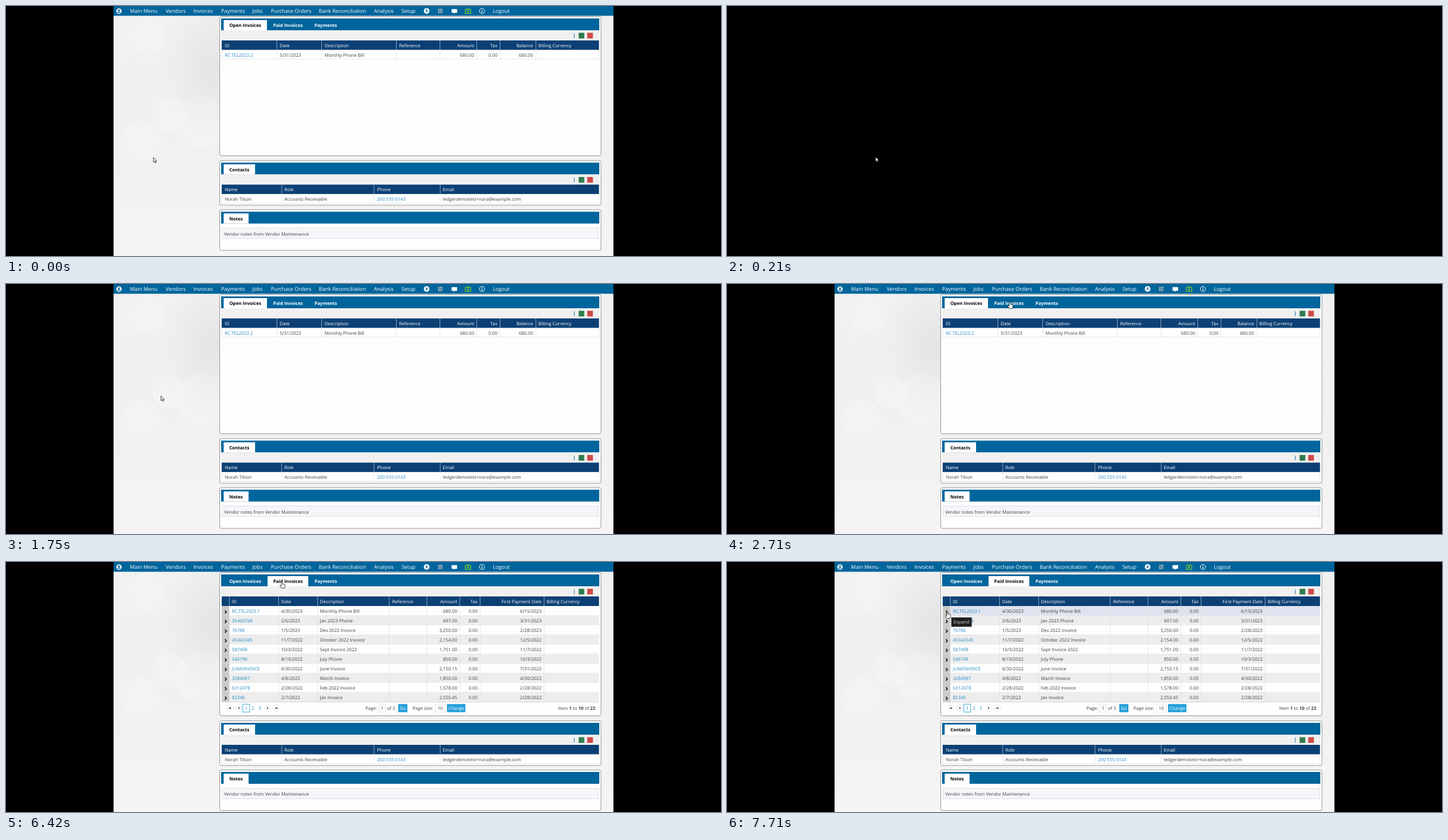
An HTML page for the animation above (8000 ms loop, 1263 by 443 pixels).

```html
<!DOCTYPE html>
<html lang="en">
<head>
<meta charset="utf-8">
<title>Vendor invoices</title>
<style>
html, body { margin: 0; width: 100%; height: 100%; overflow: hidden; background: #000002; }
svg { display: block; width: 100vw; height: 100vh; }
text { font-family: "Open Sans", "Noto Sans", sans-serif; font-size: 8px; fill: #3f3f3f; text-rendering: geometricPrecision; white-space: pre; }
.nav { font-size: 9.2px; fill: #fff; }
.tab { font-weight: 700; fill: #fff; }
.tab.on { fill: #000; }
.head { fill: #fff; }
.link { fill: #2389c6; }
.bold { font-weight: 700; }
</style>
</head>
<body>
<svg id="stage" viewBox="0 0 1263 443" xmlns="http://www.w3.org/2000/svg"></svg>
<script>
const LOOP = 8000;
const BLUE = '#00659c', NAVY = '#0c4075', SKY = '#259fda';

const rect = (x, y, w, h, fill, extra = '') =>
  `<rect x="${x}" y="${y}" width="${w}" height="${h}" fill="${fill}" ${extra}/>`;
const circle = (x, y, r, fill, extra = '') =>
  `<circle cx="${x}" cy="${y}" r="${r}" fill="${fill}" ${extra}/>`;
const path = (d, fill, extra = '') => `<path d="${d}" fill="${fill}" ${extra}/>`;
const text = (x, y, s, cls = '', anchor = 'start') =>
  `<text x="${x}" y="${y}" class="${cls}" text-anchor="${anchor}">${s}</text>`;
const vline = (x, y, h, color) => rect(x - 0.4, y, 0.8, h, color);
const group = (id, body) => `<g id="${id}">${body}</g>`;

function backdrop() {
  const bokeh = [[248, 52, 34], [345, 205, 46], [288, 192, 30], [238, 240, 36]];
  return `<defs>
    <linearGradient id="paper" x1="0" y1="0" x2="0" y2="1">
      <stop offset="0" stop-color="#f1f1f2"/><stop offset=".5" stop-color="#f0f0f1"/><stop offset="1" stop-color="#f5f5f6"/>
    </linearGradient>
    <radialGradient id="shade"><stop offset="0" stop-color="#dcdcde" stop-opacity=".6"/><stop offset="1" stop-color="#dcdcde" stop-opacity="0"/></radialGradient>
    <clipPath id="page"><rect x="190" y="0" width="883" height="443"/></clipPath></defs>` +
    rect(190, 0, 883, 443, 'url(#paper)') +
    `<g clip-path="url(#page)"><ellipse cx="365" cy="110" rx="90" ry="120" fill="url(#shade)"/>` +
    bokeh.map(([x, y, r]) => circle(x, y, r, '#fff', 'opacity=".16"')).join('') + '</g>';
}

function navBar() {
  const items = [[219, 'Main Menu'], [282, 'Vendors'], [331, 'Invoices'], [380, 'Payments'],
    [435, 'Jobs'], [468, 'Purchase Orders'], [552.5, 'Bank Reconciliation'],
    [650, 'Analysis'], [698.5, 'Setup'], [860, 'Logout']];
  let out = rect(190, 0, 883, 17.3, BLUE) + items.map(([x, s]) => text(x, 12, s, 'nav')).join('');
  out += circle(199.6, 9, 4.7, '#fff') + circle(199.6, 7.4, 1.6, BLUE) + path('M196.8 11.8a2.8 2.4 0 0 1 5.6 0z', BLUE);
  out += circle(743, 8.8, 5, '#fff') +
    `<text x="743" y="11.4" text-anchor="middle" style="font-size:7px;font-weight:700;fill:${BLUE}">8</text>`;
  for (let i = 0; i < 9; i++)
    out += rect(763.2 + (i % 3) * 2.8, 5 + Math.floor(i / 3) * 2.8, 2, 2, i % 4 ? '#c3cbd6' : '#d6a29a');
  out += path('M788 5.5h8q1 0 1 1v4.6q0 1-1 1h-3l-2 2v-2h-3q-1 0-1-1v-4.6q0-1 1-1z', '#fff');
  out += rect(811.4, 6.2, 9.6, 7, 'none', 'stroke="#86cf28" stroke-width="1.2"') +
    path('M813.5 3.6l2.7 2.4 2.7-2.4', 'none', 'stroke="#86cf28"') + path('M814.8 7.5v4.4l3.8-2.2z', '#86cf28');
  out += circle(840.8, 8.8, 4.5, 'none', 'stroke="#fff" stroke-width="1"') +
    rect(840.2, 8, 1.2, 3.6, '#fff') + rect(840.2, 5.9, 1.2, 1.2, '#fff');
  return out;
}

// Rounded box with a blue tab strip; tabs are [label x, label, left, right].
function panel(top, bottom, tabs, active = 0) {
  return rect(377.5, top, 673.5, bottom - top, '#fdfefd', 'rx="3" stroke="#929292" stroke-width="1"') +
    rect(380, top + 3.5, 668, 21, BLUE) +
    tabs.map(([x, label, left, right], i) =>
      (i === active ? rect(left, top + 6.5, right - left, 18, '#fff') : '') +
      text(x, top + 18.9, label, i === active ? 'tab on' : 'tab')).join('');
}

function toolStrip(y) {
  return rect(380, y, 668, 18, '#f0f0f0') + rect(1003.2, y + 5.5, 1.2, 8.5, '#3d7fae') +
    rect(1011.5, y + 4.5, 10, 10, '#2f7d4f') + rect(1026.7, y + 4.5, 10, 10, '#cf4a45');
}

// Columns are [text x, title, right aligned, separator x].
function gridHead(y, cols) {
  return rect(381, y, 666.5, 17, NAVY) + cols.map(([x, title, right, sep]) =>
    text(x, y + 11.8, title, 'head', right ? 'end' : 'start') + (sep ? vline(sep, y, 17, '#aebfd2') : '')).join('');
}

function gridRow(y, cols, cells, linkCol) {
  return cols.map(([x, , right, sep], i) =>
    text(x, y + 11.5, cells[i], i === linkCol ? 'link' : '', right ? 'end' : 'start') +
    (sep ? vline(sep, y, 16.5, '#e0e0e0') : '')).join('');
}

const rowFrame = y => rect(381.2, y, 666, 16, '#fff', 'stroke="#dedede" stroke-width=".8"');
const invoiceTabs = [[394.5, 'Open Invoices', 384.5, 461], [472, 'Paid Invoices', 462, 534], [545, 'Payments', 535, 594]];

function openInvoices() {
  const cols = [[386.5, 'ID', 0, 478.5], [483.5, 'Date', 0, 557.5], [562.7, 'Description', 0, 689.5],
    [694.5, 'Reference', 0, 766.5], [827, 'Amount', 1, 831.5], [868, 'Tax', 1, 872.7],
    [931, 'Balance', 1, 936], [940.5, 'Billing Currency', 0, 0]];
  return panel(18.5, 265.5, invoiceTabs, 0) + toolStrip(43) + gridHead(61, cols) + rowFrame(78) +
    gridRow(78, cols, ['RC.TEL2023.2', '5/31/2023', 'Monthly Phone Bill', '', '680.00', '0.00', '680.00', ''], 0);
}

function pager() {
  const y = 259, base = 262;
  const field = (x, w, stroke) => rect(x, y - 7, w, 14, '#fff', `stroke="${stroke}" stroke-width=".9"`);
  const button = (x, w, s) => rect(x, y - 7.3, w, 14.5, SKY) + text(x + w / 2, base, s, 'head', 'middle');
  const arrow = (x, dir, bar) => circle(x, y, 5.6, '#fff', 'stroke="#dedede" stroke-width=".8"') +
    path(`M${x - 1.4 * dir} ${y - 2}l${3 * dir} 2l${-3 * dir} 2z`, '#444') +
    (bar ? rect(x + 1.8 * dir - 0.4, y - 2, 0.8, 4, '#444') : '');
  return arrow(396, -1, 1) + arrow(411, -1, 0) + arrow(462.5, 1, 0) + arrow(477.5, 1, 1) +
    field(418.3, 12, SKY) + [1, 2, 3].map(n => text(412.3 + n * 12, base, n, 'link', 'middle')).join('') +
    text(635, base, 'Page:') + field(658.5, 11.5, '#ddd') + text(664.3, base, '1', '', 'middle') +
    text(673, base, 'of 3') + button(693, 16, 'Go') +
    text(718, base, 'Page size:') + field(758.5, 17, '#e4e4e4') + text(767, base, '10', '', 'middle') +
    button(779, 32.5, 'Change') +
    text(1041, base, 'Item <tspan class="bold">1</tspan> to <tspan class="bold">10</tspan> of <tspan class="bold">22</tspan>', '', 'end');
}

function paidInvoices() {
  const cols = [[399, 'ID', 0, 481.5], [486, 'Date', 0, 550.5], [554.5, 'Description', 0, 677],
    [682, 'Reference', 0, 743.5], [797, 'Amount', 1, 801.7], [833, 'Tax', 1, 837.5],
    [946, 'First Payment Date', 1, 950.5], [955, 'Billing Currency', 0, 0]];
  const rows = `RC.TEL2023.1|4/30/2023|Monthly Phone Bill|680.00|6/15/2023
35466768|2/6/2023|Jan 2023 Phone|697.00|3/31/2023
76786|1/5/2023|Dev 2022 Invoice|3,250.00|2/28/2023
45342345|11/7/2022|October 2022 Invoice|2,154.00|12/5/2022
587498|10/3/2022|Sept Invoice 2022|1,751.00|11/7/2022
546798|8/19/2022|July Phone|850.00|10/3/2022
JUNEINVOICE|6/30/2022|June Invoice|2,150.15|7/31/2022
3284987|4/8/2022|March Invoice|1,850.00|4/30/2022
6312478|2/28/2022|Feb 2022 Invoice|1,578.00|2/28/2022
82346|2/7/2022|Jan Invoice|2,550.45|2/28/2022`.split('\n').map(r => r.split('|'));
  let out = panel(18.5, 272.5, invoiceTabs, 1) + toolStrip(43) + gridHead(61, cols) + vline(394.5, 61, 17, '#aebfd2');
  rows.forEach(([id, date, about, amount, paid], i) => {
    const y = 78 + i * 17;
    out += rect(394.5, y, 653, 17, i % 2 ? '#ededed' : '#fefefe', i ? '' : 'id="firstRow"') +
      rect(381, y, 13.5, 17, '#c9c9c9') + rect(381, y + 16.5, 666.5, 0.5, '#e2e2e2') +
      path(`M386.7 ${y + 7.7}l2.7 2.7-2.7 2.7`, 'none', 'stroke="#111" stroke-width="1.5"') +
      gridRow(y, cols, [id, date, about, '', amount, '0.00', paid, ''], 0);
  });
  return out + rect(381, 248, 666.5, 0.7, '#d5d5d5') + pager();
}

function contactsAndNotes() {
  const cols = [[386.5, 'Name', 0, 487], [491.7, 'Role', 0, 650], [655.5, 'Phone', 0, 767], [771.5, 'Email', 0, 0]];
  return panel(274, 353, [[394.5, 'Contacts', 384.5, 440]]) + toolStrip(298.5) + gridHead(316.5, cols) + rowFrame(333.5) +
    gridRow(333.5, cols, ['Norah Tilson', 'Accounts Receivable', '200 555-0143', 'ledgerdemotest+nora@example.com'], 2) +
    panel(361, 433, [[394.5, 'Notes', 384.5, 428.5]]) +
    rect(381.5, 393.5, 665.5, 18.5, '#f4f6f9', 'stroke="#d9dcdf" stroke-width=".9"') +
    text(385.2, 406.5, 'Vendor notes from Vendor Maintenance');
}

const tooltip = rect(396.5, 98.5, 35.5, 16, '#1f1f1f', 'stroke="#4a4a4a" stroke-width=".8"') +
  '<text x="414" y="109.3" text-anchor="middle" style="fill:#d6d6d6">Expand</text>';
const pen = 'stroke="#111" stroke-width=".8" stroke-linejoin="round"';
const arrowCursor = path('M.4 .4V8.8L2.3 7.1 3.7 10.1 5 9.5 3.7 6.5H6.2Z', '#fff', pen);
const handCursor = path('M-1.1 .9Q0-.7 1.1 .9V4L4.7 4.8Q5.8 5.2 5.6 6.6L4.7 11.3H-1L-3.6 7.3Q-3.7 5.8-2.3 6.3L-1.1 7.4Z', '#fff', pen);

document.getElementById('stage').innerHTML = rect(0, 0, 1263, 443, '#000002') +
  group('app', backdrop() + group('open', openInvoices()) + group('paid', paidInvoices()) +
    group('lower', contactsAndNotes()) + navBar() + group('tip', tooltip)) +
  group('arrow', arrowCursor) + group('hand', handCursor);

const el = id => document.getElementById(id);
const [app, open, paid, lower, tip, arrow, hand, firstRow] =
  ['app', 'open', 'paid', 'lower', 'tip', 'arrow', 'hand', 'firstRow'].map(el);
const show = (node, on) => node.setAttribute('display', on ? 'inline' : 'none');

const smooth = k => k * k * (3 - 2 * k);
const glide = k => Math.sin(k * Math.PI / 2);

// Pointer stops: time, x, y of the hot spot, easing on the way there.
const route = [
  [0, 260, 268], [30, 260, 268], [210, 262, 267],
  [1195, 262, 267], [1320, 265.5, 203],
  [1555, 265.5, 203], [1650, 259, 209], [2320, 498, 24],
  [2445, 498, 24], [2710, 499.5, 32],
  [6420, 499.5, 32], [6420, 487.5, 35], [6850, 372, 90, glide], [7100, 389.5, 88.5],
  [LOOP, 389.5, 88.5]];

function pointerAt(t) {
  const i = route.findIndex(stop => stop[0] > t);
  const [t0, x0, y0] = route[i - 1], [t1, x1, y1, ease = smooth] = route[i];
  const k = ease((t - t0) / (t1 - t0));
  return [x0 + (x1 - x0) * k, y0 + (y1 - y0) * k];
}

function render(t) {
  const [x, y] = pointerAt(t);
  const isPaid = t >= 4530;
  const onTab = x > 385 && x < 594 && y > 22 && y < 43;
  const onRow = isPaid && x > 381 && y > 78 && y < 95;
  const isHand = onTab || (onRow && x < 394.5);
  show(app, t < 210 || t >= 250);
  show(open, !isPaid);
  show(paid, isPaid);
  lower.setAttribute('transform', `translate(0 ${isPaid ? 7.5 : 0})`);
  firstRow.setAttribute('fill', onRow ? '#dfe3ef' : '#fefefe');
  show(tip, t >= 7710);
  show(arrow, !isHand);
  show(hand, isHand);
  (isHand ? hand : arrow).setAttribute('transform', `translate(${x.toFixed(2)} ${y.toFixed(2)})`);
}

let start;
function tick(now) {
  start ??= now;
  render((now - start) % LOOP);
  requestAnimationFrame(tick);
}
render(0);
requestAnimationFrame(tick);
</script>
</body>
</html>
```
